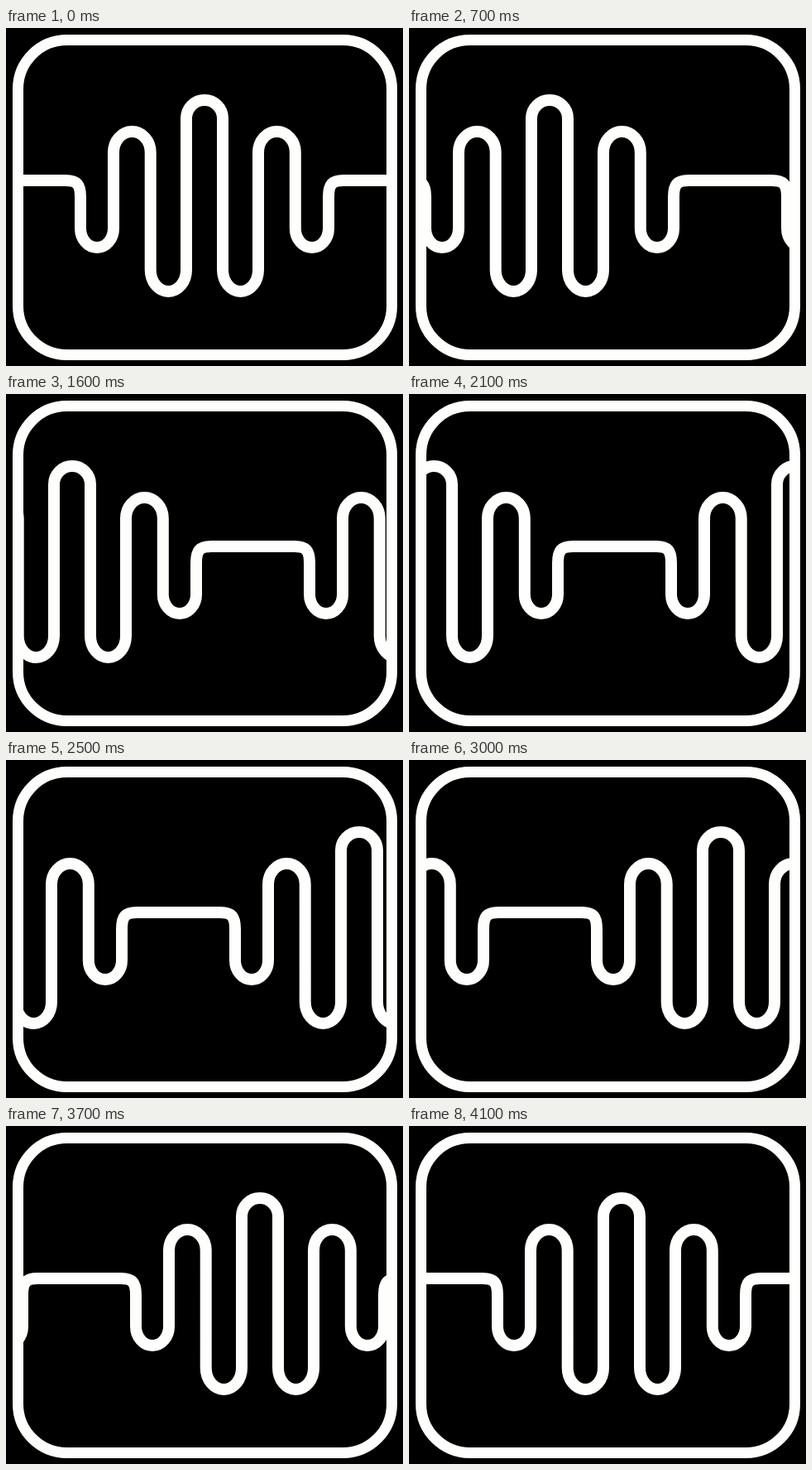
Recreate the animation shown at these times as an HTML page with a canvas. Size 480 px wide and 408 px high, loop 4.2 s.

```html
<!DOCTYPE html>
<html lang="en">
<head>
<meta charset="utf-8">
<title>Scrolling wave</title>
<style>
  html, body { margin: 0; width: 100%; height: 100%; overflow: hidden; background: #000; }
  canvas { display: block; }
</style>
</head>
<body>
<canvas id="stage" width="480" height="408"></canvas>
<script>
const ctx = document.getElementById('stage').getContext('2d');
const INK = '#fefefc';
const STEP_MS = 100, STEPS = 42, STEP_PX = 10, PERIOD = 437;
const SKIP_AT = 39; // the scroll jumps one extra step here

// Each bend spans two legs: [right leg x, y where the bend starts, bend height]
const FIRST_LEG = 90;
const BENDS = [
  [130, 242, 23], [174.7, 150, -25], [218, 292, 26], [262, 109, -22],
  [305, 292, 26], [349.8, 150, -25], [390, 242, 23]
];

function buildWave() {
  const path = new Path2D();
  path.moveTo(72, 184);
  path.bezierCurveTo(86, 184, 90, 189, 90, 204);
  let left = FIRST_LEG;
  for (const [right, y, height] of BENDS) {
    path.lineTo(left, y);
    path.ellipse((left + right) / 2, y, (right - left) / 2, Math.abs(height),
                 0, Math.PI, 0, height > 0);
    left = right;
  }
  path.lineTo(390, 204);
  path.bezierCurveTo(390, 189, 394, 184, 408, 184);
  path.lineTo(73 + PERIOD, 184);
  return path;
}

const wave = buildWave();
const frame = new Path2D();
frame.roundRect(14.5, 14.5, 452, 380, 59);
const inside = new Path2D();
inside.rect(20, 20, 441, 369);

function draw(time) {
  const step = Math.floor(time / STEP_MS) % STEPS;
  const shift = STEP_PX * (step + (step >= SKIP_AT ? 1 : 0));

  ctx.fillStyle = '#000';
  ctx.fillRect(0, 0, 480, 408);
  ctx.strokeStyle = INK;

  ctx.save();
  ctx.clip(inside);
  ctx.lineWidth = 14;
  ctx.translate(-shift - PERIOD, 0);
  for (let copy = 0; copy < 3; copy++) {
    ctx.stroke(wave);
    ctx.translate(PERIOD, 0);
  }
  ctx.restore();

  ctx.lineWidth = 13;
  ctx.stroke(frame);
}

function tick() {
  draw(performance.now() - start);
  requestAnimationFrame(tick);
}

const start = performance.now();
tick();
</script>
</body>
</html>
```
